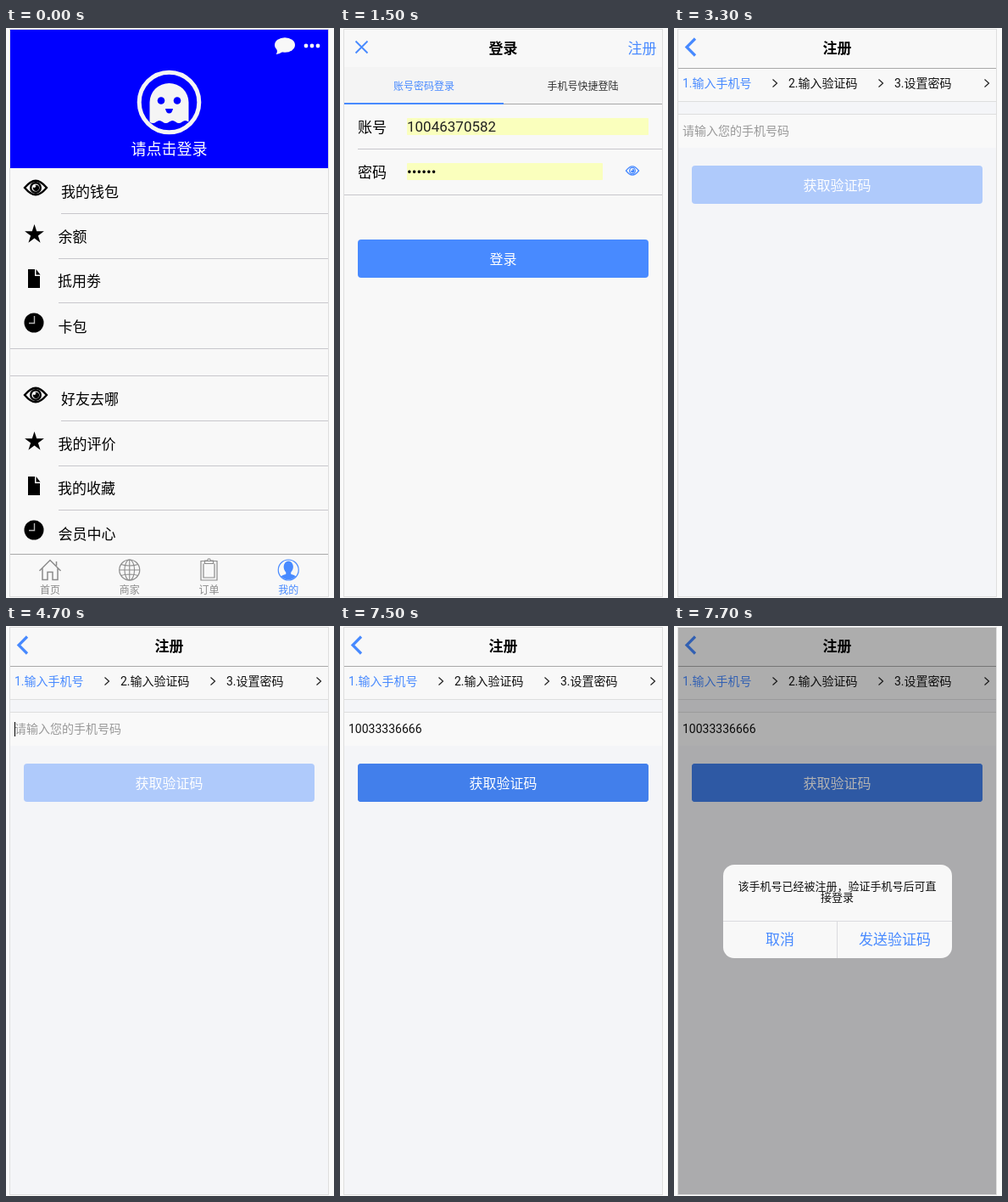
Write an HTML page with a canvas that moves like this. It is 387x671 px and loops after 8 s.

```html
<!DOCTYPE html>
<html lang="zh-CN">
<head>
<meta charset="utf-8">
<title>登录与注册</title>
<style>
  html, body { margin: 0; width: 100%; height: 100%; overflow: hidden; background: #fafafa; }
  canvas { display: block; width: 387px; height: 671px; }
</style>
</head>
<body>
<canvas id="stage"></canvas>
<script>
const W = 387, H = 671, LOOP = 8000, TICK = 100;
const L = 5, T = 2, R = 380, B = 669, MID = 192.5;
const BLUE = '#488aff', PRESSED = '#427feb', PANEL = '#f8f8f8', LINE = '#c8c7cc', GREY = '#8c8c8c';
const FONT = 'Roboto, "Noto Sans CJK SC", "Noto Sans CJK", sans-serif';
const ACCOUNT = '10046370582', PHONE = '10033336666';

const canvas = document.getElementById('stage');
const c = canvas.getContext('2d');
const dpr = window.devicePixelRatio || 1;
canvas.width = Math.round(W * dpr);
canvas.height = Math.round(H * dpr);

// ---------- helpers ----------

const clamp = v => Math.max(0, Math.min(1, v));

// cubic-bezier(.36, .66, .04, 1)
function ease(x) {
  x = clamp(x);
  const curve = (s, a, b) => 3 * (1 - s) * (1 - s) * s * a + 3 * (1 - s) * s * s * b + s * s * s;
  let lo = 0, hi = 1;
  for (let i = 0; i < 24; i++) {
    const s = (lo + hi) / 2;
    if (curve(s, .36, .04) < x) lo = s; else hi = s;
  }
  return curve(hi, .66, 1);
}

function box(x, y, x2, y2, color) {
  c.fillStyle = color;
  c.fillRect(x, y, x2 - x, y2 - y);
}

const rule = (x, y, color = LINE, x2 = R) => box(x, y, x2, y + 1, color);

function round(x, y, x2, y2, r, color) {
  c.beginPath();
  c.roundRect(x, y, x2 - x, y2 - y, r);
  c.fillStyle = color;
  c.fill();
}

// y is the middle of the line of text
function text(str, x, y, size, color, align = 'left', weight = 400) {
  c.font = `${weight} ${size}px ${FONT}`;
  c.textAlign = align;
  c.fillStyle = color;
  c.fillText(str, x, y + size * .38);
}

function disc(x, y, rx, color, ry = rx) {
  c.beginPath();
  c.ellipse(x, y, rx, ry, 0, 0, 7);
  c.fillStyle = color;
  c.fill();
}

function ring(x, y, rx, color, width, ry = rx) {
  c.beginPath();
  c.ellipse(x, y, rx, ry, 0, 0, 7);
  c.strokeStyle = color;
  c.lineWidth = width;
  c.stroke();
}

function stroke(path, color, width) {
  c.strokeStyle = color;
  c.lineWidth = width;
  c.stroke(new Path2D(path));
}

function fill(path, color) {
  c.fillStyle = color;
  c.fill(new Path2D(path));
}

function group(draw, dx = 0, dy = 0, alpha = 1) {
  c.save();
  c.translate(dx, dy);
  c.globalAlpha *= alpha;
  draw();
  c.restore();
}

// ---------- icons, drawn around their own centre ----------

function eye(color, width) {
  stroke('M-13 0 Q-6 -8.3 0 -8.3 Q6 -8.3 13 0 Q6 8.3 0 8.3 Q-6 8.3 -13 0 Z', color, width);
  ring(0, 0, 5.8, color, width);
  disc(.5, .3, 3.6, color);
  disc(-1.6, -1.8, 1.7, PANEL);
}

function star() {
  c.beginPath();
  for (let i = 0; i < 10; i++) {
    const a = -Math.PI / 2 + i * Math.PI / 5, r = i % 2 ? 4.6 : 12;
    c.lineTo(r * Math.cos(a), r * Math.sin(a));
  }
  c.fillStyle = '#000';
  c.fill();
}

function sheet() {
  fill('M-7 -11 H1 V-3 H7 V11 H-7 Z M2.5 -11 L7.5 -4.5 H2.5 Z', '#000');
}

function clock() {
  disc(0, 0, 11.5, '#000');
  stroke('M.5 -8 V.5 H-6', '#b5b5b5', 1.4);
}

function home() {
  stroke('M-12.5 1 L0 -11.5 L12.5 1 M-9 -2 V11.5 H-3 V2.5 H3 V11.5 H9 V-2 M7.5 -5 V-10', GREY, 1.5);
}

function globe() {
  ring(0, 0, 12, GREY, 1.2);
  ring(0, 0, 5.8, GREY, 1.1, 12);
  stroke('M0 -12 V12 M-12 0 H12 M-10 -6.5 Q0 -3.5 10 -6.5 M-10 6.5 Q0 3.5 10 6.5', GREY, 1.1);
}

function clipboard() {
  stroke('M-9.5 -10.5 H9.5 V12 H-9.5 Z M-6.5 -7.5 V9 H6.5 V-7.5', GREY, 1.2);
  stroke('M-5 -7.5 V-11 H-2 L-1 -13 H1 L2 -11 H5 V-7.5 Z', GREY, 1.2);
}

function person() {
  ring(0, 0, 12, BLUE, 1.2);
  c.beginPath();
  c.arc(0, 0, 11.4, 0, 7);
  c.clip();
  disc(0, -3.5, 5.6, BLUE, 7);
  fill('M-3 1 H3 V5 Q9 6.5 10 9 V13 H-10 V9 Q-9 6.5 -3 5 Z', BLUE);
}

function ghost() {
  const white = '#f5f5f5';
  ring(0, 0, 35.3, white, 5);
  fill('M-23 23 V0 A23 22.5 0 0 1 23 0 V23 Q19 20 15.3 23 Q11.5 26 7.7 23 Q4 20 0 23 Q-4 26 -7.7 23 Q-11.5 20 -15.3 23 Q-19 26 -23 23 Z', white);
  disc(-9.5, -2, 4.3, '#00f');
  disc(9.5, -2, 4.3, '#00f');
  fill('M-4.5 7.5 H4.5 Q3.5 13 0 13 Q-3.5 13 -4.5 7.5 Z', '#00f');
}

// ---------- pages ----------

function row(icon, label, x, cx, cy, textY) {
  group(icon, cx, cy);
  text(label, x, textY, 17, '#000');
}

function profile() {
  box(L, T, R, B, PANEL);
  box(L, T, R, 165, '#00f');
  disc(329, 20, 12, '#f8f8f8', 8.7);
  fill('M319 24 Q321 28 318.5 31 Q324 30.5 327 27 Z', '#f8f8f8');
  for (const x of [354, 361, 368]) disc(x, 21, 2.4, '#f8f8f8');
  group(ghost, MID, 87.5);
  text('请点击登录', MID, 142, 18, '#fff', 'center', 500);

  const lists = [['我的钱包', '余额', '抵用劵', '卡包'], ['好友去哪', '我的评价', '我的收藏', '会员中心']];
  lists.forEach((names, i) => {
    const y = i * 244;
    row(() => eye('#000', 2.4), names[0], 65, 35, 188 + y, 193 + y);
    row(star, names[1], 61.5, 33.5, 243 + y, 246 + y);
    row(sheet, names[2], 61, 33, 295 + y, 298 + y);
    row(clock, names[3], 61.5, 33, 347 + y, 351.5 + y);
    rule(65, 218 + y);
    rule(62, 271 + y);
    rule(62, 323 + y);
  });
  rule(L, 377);
  rule(L, 409);

  rule(L, 619, '#a9a9a9');
  const tabs = [[home, '首页'], [globe, '商家'], [clipboard, '订单'], [person, '我的']];
  tabs.forEach(([icon, name], i) => {
    const x = 52 + i * 93.75;
    group(icon, x, 638);
    text(name, x, 661.5, 12, i === 3 ? BLUE : GREY, 'center');
  });
}

function button(label, y, state = 1, press = 0) {
  group(() => round(21, y, 364, y + 45, 4, BLUE), 0, 0, state);
  if (press) group(() => round(21, y, 364, y + 45, 4, PRESSED), 0, 0, press);
  text(label, MID, y + 22.5, 16, '#fff', 'center');
}

// leave: how far the next page has pushed this one away
function login(leave, tapped) {
  const shift = -leave * 123.75;
  box(L, T, R, B, PANEL);
  box(L, 46, R, 90, '#f4f4f4');
  group(() => stroke('M18.5 15.5 L32.5 29.5 M32.5 15.5 L18.5 29.5', BLUE, 1.8), 0, 0, 1 - leave);
  group(() => text('登录', MID, 23.5, 17, '#000', 'center', 700), shift, 0, 1 - .8 * leave);
  group(() => text('注册', 373.5, 23.5, 17, BLUE, 'right'), 0, 0, tapped ? .4 : 1 - leave);
  group(() => {
    text('账号密码登录', 99, 68, 12, BLUE, 'center');
    text('手机号快捷登陆', 286.5, 68, 12, '#333', 'center');
    rule(193, 89, '#a8a8a8', R + 124);
    box(L, 88, 193, 90, BLUE);
  }, shift);

  text('账号', 21, 117, 17, '#000');
  round(79, 106, 364, 126, 1, '#faffbd');
  text(ACCOUNT, 79, 116, 17, '#222');
  rule(21, 142);
  text('密码', 21, 170, 17, '#000');
  round(79, 159, 310, 179, 1, '#faffbd');
  text('••••••', 79, 169, 17, '#000');
  c.save();
  c.translate(345, 168);
  c.scale(.58, .62);
  eye(BLUE, 2.2);
  c.restore();
  rule(L, 196);
  button('登录', 249);
}

const backArrow = () => stroke('M25 12.5 L15 22.5 L25 32.5', BLUE, 3.2);

function register(enter, t) {
  const typed = t >= 5600;
  const fading = enter < 1 ? enter : 1;
  box(L, T, R, B, '#f4f5f8');
  box(L, T, R, 86, PANEL);
  rule(L, 47, '#a9a9a9');
  group(() => text('注册', MID, 24, 17, '#000', 'center', 700), 0, 0, fading);

  ['1.输入手机号', '2.输入验证码', '3.设置密码'].forEach((step, i) => {
    const x = i * 125;
    text(step, 10 + x, 65, 14, i ? '#111' : BLUE);
    group(() => stroke('M116.5 60.5 L121.5 65 L116.5 69.5', '#222', 1.2), x);
  });
  rule(L, 86, '#dedede');
  rule(L, 101, '#dedede');
  box(L, 102, R, 141, '#f9f9f9');
  if (typed) text(PHONE, 10, 120.5, 14, '#111');
  else text('请输入您的手机号码', 10, 121, 14, '#999');

  if (t >= 4700 && t < 5100) box(10, 113, 11, 130, '#000');
  if ((t >= 5600 && t < 6100) || (t >= 6500 && t < 7000)) box(96, 113, 97, 130, '#000');

  const state = .4 + .6 * clamp((t - 5550) / 100);
  button('获取验证码', 162, typed ? state : .4, clamp((t - 7350) / 100));
}

function alertBox(p) {
  group(() => box(L, T, R, B, '#000'), 0, 0, .3 * p);
  c.save();
  c.globalAlpha = p;
  c.translate(193, 336);
  c.scale(1.1 - .1 * p, 1.1 - .1 * p);
  c.translate(-193, -336);
  round(58, 281, 328, 391, 13, PANEL);
  text('该手机号已经被注册，验证手机号后可直', MID, 306, 13, '#111', 'center');
  text('接登录', MID, 319, 13, '#111', 'center');
  rule(58, 347, '#dbdbdf', 328);
  box(192, 347, 193, 391, '#dbdbdf');
  text('取消', 125, 369, 17, BLUE, 'center');
  text('发送验证码', 260.5, 369, 17, BLUE, 'center');
  c.restore();
}

// ---------- timeline ----------

function draw(t) {
  c.setTransform(canvas.width / W, 0, 0, canvas.height / H, 0, 0);
  box(0, 0, W, H, '#fafafa');
  box(L - 1, T - 1, R + 1, B + 1, '#dedede');
  c.save();
  c.beginPath();
  c.rect(L, T, R - L, B - T);
  c.clip();

  const rise = t < 1200 ? 0 : t >= 1500 ? 1 : ease((t - 1150) / 400);
  const push = ease((t - 2779) / 500);
  if (rise < 1) profile();
  if (rise > 0 && push < 1) group(() => login(push, t === 2700), 0, (1 - rise) * (B - T));
  if (push > 0) {
    group(() => register(push, t), (1 - push) * (R - L));
    group(backArrow, 0, 0, push);
  }
  if (t >= 7600) alertBox(t >= 7700 ? 1 : ease((t - 7570) / 200));
  // the back arrow lies under the dimming layer
  c.restore();
}

let start = null;
function frame(now) {
  if (start === null) start = now;
  const t = (now - start) % LOOP;
  draw(Math.floor(t / TICK) * TICK);
  requestAnimationFrame(frame);
}
draw(0);
requestAnimationFrame(frame);
</script>
</body>
</html>
```
